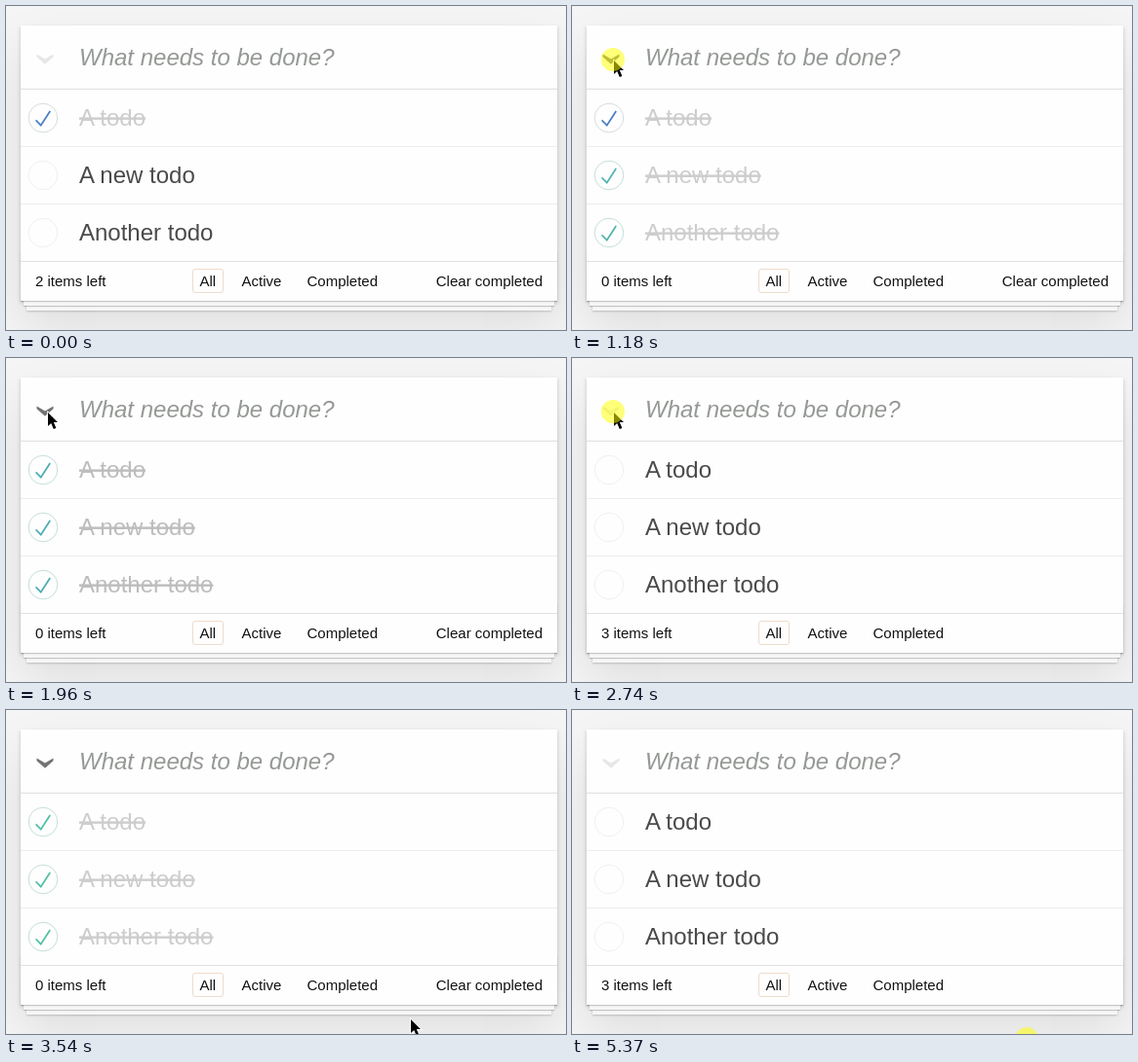
These frames come from a looping animation (574 by 333 pixels, 5450 ms). An HTML page:

```html
<!DOCTYPE html>
<html lang="en">
<head>
<meta charset="utf-8">
<title>Todo list</title>
<style>
  html, body { margin: 0; width: 100%; height: 100%; overflow: hidden; background: #f5f5f5; }
  .card, .footer, svg { position: absolute; }
  .card {
    left: 15px; top: 20px; width: 550px; height: 283px; background: #fff;
    box-shadow: 0 2px 4px rgba(0,0,0,.2), 0 25px 50px rgba(0,0,0,.1);
  }
  .footer {
    left: 0; bottom: 0; width: 550px; height: 50px;
    box-shadow: 0 1px 1px rgba(0,0,0,.2), 0 8px 0 -3px #f6f6f6, 0 9px 1px -3px rgba(0,0,0,.2),
      0 16px 0 -6px #f6f6f6, 0 17px 2px -6px rgba(0,0,0,.2);
  }
  .cover { position: absolute; inset: 0; background: #fefefe; }
  svg { left: 0; top: 0; }
  text { font: 24px "Liberation Sans", Arial, sans-serif; white-space: pre; }
  .small { font-size: 15px; fill: #111; }
  .placeholder { font-style: italic; fill: #959995; }
</style>
</head>
<body>
<div class="card"><div class="footer"></div><div class="cover"></div></div>
<svg width="574" height="333" viewBox="0 0 574 333">
  <path id="chevron" d="M31.5 49.5L40 54.5 48.5 49.5V52.3L40 59.7 31.5 52.3Z"/>
  <text class="placeholder" x="75" y="61">What needs to be done?</text>
  <path d="M15 84h550" stroke="#f8f8f8" transform="translate(0 .5)"/>
  <path d="M15 85.5h550M15 262.5h550" stroke="#e2e2e2"/>
  <path d="M15 144.5h550M15 203.5h550" stroke="#ededed"/>
  <g id="items"></g>
  <text class="small" id="count" x="30" y="288"></text>
  <rect x="191.5" y="270.5" width="31" height="24" rx="2.5" fill="none" stroke="#ecdccb"/>
  <text class="small" x="198.5" y="288">All</text>
  <text class="small" x="241.5" y="288">Active</text>
  <text class="small" x="308.5" y="288">Completed</text>
  <text class="small" id="clear" x="550" y="288" text-anchor="end">Clear completed</text>
  <g id="pointer">
    <path d="M0 0V14L3.2 11 5.8 17 8.4 16 5.8 10H10Z" stroke="#fff" stroke-width="1.6" paint-order="stroke"/>
    <circle id="press" cx="-1" cy="-1" r="12" fill="#ff0" fill-opacity=".53"/>
  </g>
</svg>
<script>
const LOOP = 5450, TICK = 79, FADE = 400;
const $ = id => document.getElementById(id);

const toggles = [
  { at: 9, tint: '#52b5ac' }, { at: 16 },
  { at: 22, tint: '#4cadb4' }, { at: 30 },
  { at: 36, tint: '#50c0a5' }, { at: 56 }
];
const presses = [[8, 10], [15, 17], [21, 23], [29, 31], [35, 37], [55, 57], [68, 70]];
const route = [
  [0, 466, 345], [1, 440, 322], [7, 43, 56], [38, 43, 56], [42, 400, 322],
  [43.5, 450, 341], [45, 415, 318], [49, 72, 58], [51, 7, 54], [54, 49, 66],
  [56, 49, 66], [57, 60, 65], [61, 467, 339], [70, 467, 339]
];

const items = ['A todo', 'A new todo', 'Another todo'].map((label, i) => {
  const row = document.createElementNS('http://www.w3.org/2000/svg', 'g');
  row.innerHTML = `
    <g transform="translate(23.15 ${100.2 + i * 59}) scale(.2963)">
      <circle cx="50" cy="50" r="50" fill="none" stroke-width="3"/>
      <path d="M72 25L42 71 27 56l-4 4 20 20 34-52z"/>
    </g>
    <text x="75" y="${123 + i * 59}">${label}</text>`;
  $('items').append(row);
  const [ring, check, text] = ['circle', 'path', 'text'].map(s => row.querySelector(s));
  return { ring, check, text, initiallyDone: i === 0 };
});

// The CSS "ease" curve: cubic-bezier(.25, .1, .25, 1).
function ease(x) {
  const bezier = (a, b, u) => 3 * a * u * (1 - u) ** 2 + 3 * b * u * u * (1 - u) + u ** 3;
  let low = 0, high = 1;
  for (let i = 0; i < 20; i++) {
    const mid = (low + high) / 2;
    if (bezier(.25, .25, mid) < x) low = mid; else high = mid;
  }
  return bezier(.1, 1, low);
}

function pointerAt(tick) {
  const i = Math.max(1, route.findIndex(p => p[0] >= tick));
  const [t0, x0, y0] = route[i - 1], [t1, x1, y1] = route[i];
  const k = (tick - t0) / (t1 - t0);
  return [x0 + (x1 - x0) * k, y0 + (y1 - y0) * k];
}

function drawItem(item, tick, past) {
  const allDone = past.length % 2 === 1;
  const done = past.length ? allDone : item.initiallyDone;
  const wasDone = past.length > 1 ? !allDone : item.initiallyDone;
  const last = past.at(-1);
  const k = last ? ease(Math.min(1, (tick - last.at) * TICK / FADE)) : 1;
  const shade = d => d ? 205 : 74;
  const grey = Math.round(shade(wasDone) + (shade(done) - shade(wasDone)) * k);

  const blue = item.initiallyDone && past.length < 2;
  item.text.setAttribute('fill', `rgb(${grey},${grey},${grey})`);
  item.text.setAttribute('text-decoration', done ? 'line-through' : 'none');
  item.ring.setAttribute('stroke', !done ? '#ededed' : blue ? '#d0d8d8' : '#bddad5');
  item.check.setAttribute('fill', !done ? 'none' : blue ? '#4a7fc4' : last.tint);
  return done;
}

function draw(now) {
  const tick = Math.floor((now % LOOP + 25) / TICK);
  const past = toggles.filter(t => t.at <= tick);
  const doneCount = items.filter(item => drawItem(item, tick, past)).length;
  const [x, y] = pointerAt(tick);
  const show = (id, on) => $(id).setAttribute('visibility', on ? 'visible' : 'hidden');

  $('count').textContent = `${items.length - doneCount} items left`;
  $('chevron').setAttribute('fill', doneCount === items.length ? '#737373' : '#e6e6e6');
  $('pointer').setAttribute('transform', `translate(${x} ${y})`);
  show('clear', doneCount > 0);
  show('press', presses.some(([from, to]) => tick >= from && tick < to));
}

const start = performance.now();
function loop() {
  draw(performance.now() - start);
  requestAnimationFrame(loop);
}
loop();
</script>
</body>
</html>
```
